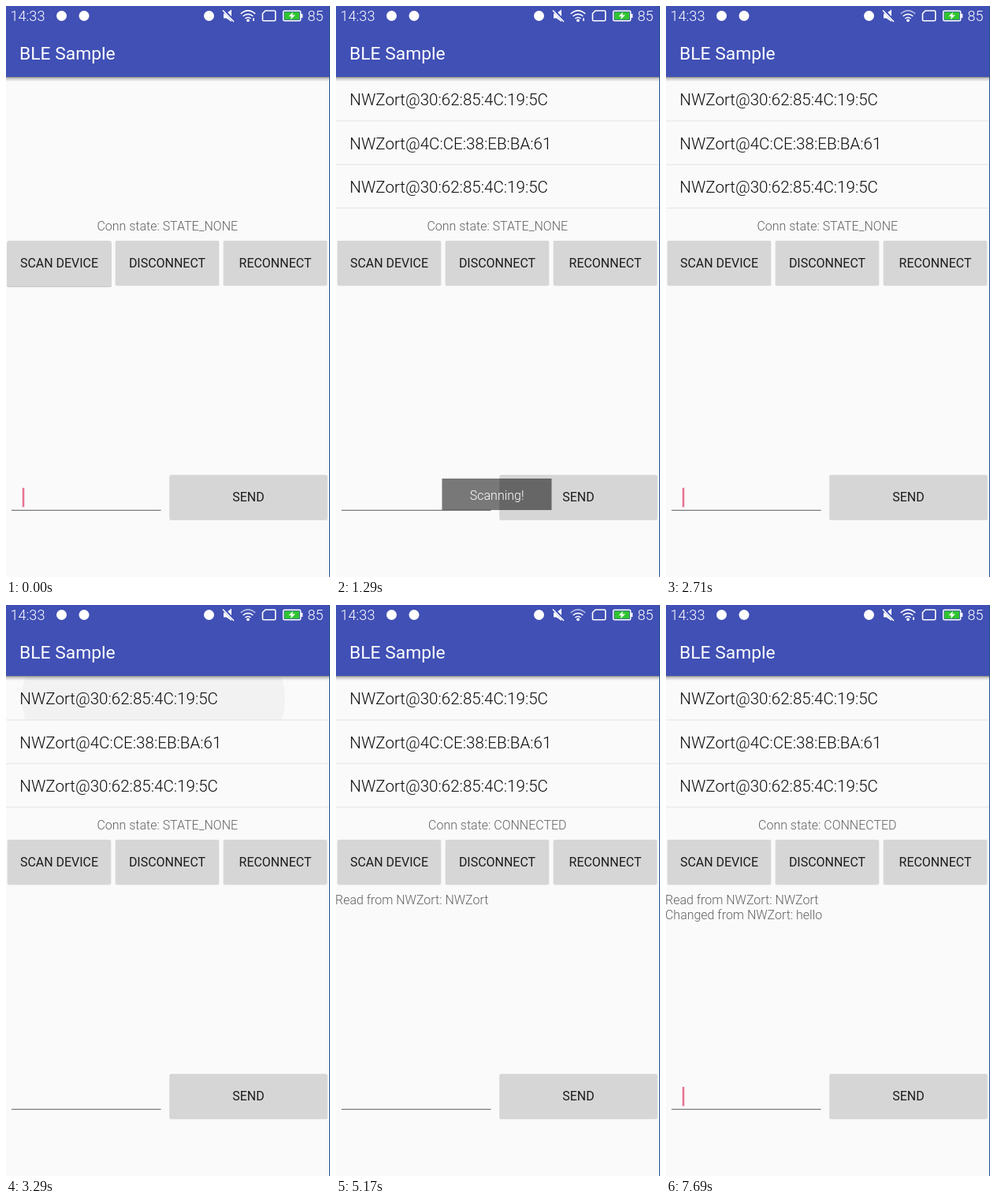
Recreate the animation shown at these times as an HTML page. Size 411 px wide and 725 px high, loop 8000 ms.

```html
<!DOCTYPE html>
<html lang="en">
<head>
<meta charset="utf-8">
<title>BLE Sample</title>
<style>
  html, body { margin: 0; width: 100%; height: 100%; overflow: hidden; background: #fafafa; }
  svg { display: block; width: 100%; height: 100%; }
  text { font-family: Roboto, "Noto Sans", sans-serif; font-weight: 300; font-size: 15.98px; }
  .clock { font-size: 18.1px; fill: #fff; }
  .title { font-size: 22.83px; font-weight: 400; fill: #fff; }
  .item { font-size: 20.55px; fill: #0c0c0c; }
  .note { fill: #626262; }
  .mid { text-anchor: middle; }
  .btn rect { fill: #d6d6d6; }
  .btn text { font-weight: 400; fill: #1d1d1d; text-anchor: middle; }
  .line { fill: none; stroke: #fff; stroke-width: 1.6; }

  /* Every change is a hard step on one 8 s clock. */
  .anim { animation: 8s step-end infinite; }
  .cursor { animation-name: blink; }
  .toast { animation-name: toast; }
  .press { animation-name: press; }
  .first { animation-name: first; }
  .rest { animation-name: rest; }
  .ripple { animation-name: ripple; }
  .idle { animation-name: idle; }
  .linked { animation-name: linked; }
  .read { animation-name: read; }
  .changed { animation-name: changed; }
  .arc { animation-name: arc; }
  .traffic { animation-name: traffic; }

  @keyframes blink {
    0%, 9.875%, 23%, 33.875%, 46.375%, 59.125%, 71.875%, 83.75%, 96.125%, 100% { opacity: 1; }
    3%, 16.125%, 29.375%, 39.625%, 53.375%, 64.625%, 78.375%, 90.75% { opacity: 0; }
  }
  @keyframes toast {
    0% { opacity: 0; }
    1.5% { opacity: .2; }
    3% { opacity: .57; }
    4.875% { opacity: .97; }
    6.75% { opacity: 1; }
    27.875% { opacity: .85; }
    29.375% { opacity: .6; }
    30.875% { opacity: .35; }
    32.375% { opacity: .13; }
    33.875%, 100% { opacity: 0; }
  }
  @keyframes press { 0% { opacity: 1; } 1.5%, 100% { opacity: 0; } }
  @keyframes first { 0% { opacity: 0; } 3%, 100% { opacity: 1; } }
  @keyframes rest { 0% { opacity: 0; } 4.875%, 100% { opacity: 1; } }
  @keyframes ripple {
    0% { opacity: 0; }
    39.625% { opacity: .07; }
    41.125% { opacity: .03; }
    44.625%, 100% { opacity: 0; }
  }
  @keyframes idle { 0% { opacity: 1; } 44.625%, 100% { opacity: 0; } }
  @keyframes linked { 0% { opacity: 0; } 44.625%, 100% { opacity: 1; } }
  @keyframes read { 0% { opacity: 0; } 64.625%, 100% { opacity: 1; } }
  @keyframes changed { 0% { opacity: 0; } 76.875%, 100% { opacity: 1; } }
  @keyframes arc { 0%, 92.625%, 100% { opacity: 1; } 17.75% { opacity: .6; } }
  @keyframes traffic { 0%, 78.375%, 100% { opacity: 1; } 27.875% { opacity: 0; } }
</style>
</head>
<body>
<svg viewBox="0 0 411 725" preserveAspectRatio="none">
  <defs>
    <linearGradient id="shade" x1="0" y1="0" x2="0" y2="1">
      <stop offset="0" stop-opacity=".5"/>
      <stop offset=".3" stop-opacity=".2"/>
      <stop offset="1" stop-opacity="0"/>
    </linearGradient>
    <clipPath id="row"><rect y="91" width="410" height="55"/></clipPath>
  </defs>
  <rect width="411" height="725" fill="#fafafa"/>

  <!-- device list -->
  <ellipse class="anim ripple" cx="187" cy="119" rx="167" ry="120" clip-path="url(#row)"/>
  <text class="item anim first" x="17.3" y="126">NWZort@30:62:85:4C:19:5C</text>
  <g class="anim rest">
    <text class="item" x="17.3" y="181.5">NWZort@4C:CE:38:EB:BA:61</text>
    <text class="item" x="17.3" y="237">NWZort@30:62:85:4C:19:5C</text>
    <path d="M0 146H410M0 201.3H410M0 256.6H410" stroke="#e4e4e4"/>
  </g>

  <!-- app bar -->
  <rect y="90" width="411" height="6" fill="url(#shade)"/>
  <rect width="411" height="90" fill="#4050b5"/>
  <text class="title" x="17" y="68">BLE Sample</text>

  <!-- status bar -->
  <text class="clock" x="5.5" y="19">14:33</text>
  <g fill="#fff">
    <circle cx="70.5" cy="12.5" r="6.5"/>
    <circle cx="99" cy="12.5" r="6.5"/>
    <circle cx="257.5" cy="12.5" r="6.5"/>
    <path d="M276 9.5H279.5L286 4.5V20L279.5 15.5H276Z"/>
  </g>
  <path d="M276 5L289.5 19.5" stroke="#4050b5" stroke-width="3.4"/>
  <path class="line" d="M275 5.5L289 20"/>
  <g class="line">
    <path class="anim arc" d="M297.8 9.8Q307 1.8 316.2 9.8"/>
    <path d="M300.6 13Q307 7.6 313.4 13M303.4 16Q307 13 310.6 16"/>
    <path class="anim traffic" d="M314 15.5V19" stroke-width="2"/>
  </g>
  <circle cx="307" cy="18.3" r="1.9" fill="#fff"/>
  <path class="line" d="M329 6H340.5Q341.8 6 341.8 7.3V17.5Q341.8 18.8 340.5 18.8H326.8Q325.5 18.8 325.5 17.5V9.5Z"/>
  <rect x="351.7" y="6.2" width="22" height="12.6" rx="1.5" fill="#4050b5" stroke="#fff" stroke-width="1.5"/>
  <rect x="374" y="10" width="2.3" height="5" fill="#fff"/>
  <rect x="353.2" y="7.7" width="19" height="9.6" fill="#2fc52f"/>
  <path d="M364 7.8L358.5 13.2H362L361 17.3L367 11.6H363.2Z" fill="#fff"/>
  <text class="clock" x="382.5" y="19">85</text>

  <!-- connection state and buttons -->
  <text class="note mid anim idle" x="204.8" y="285">Conn state: STATE_NONE</text>
  <text class="note mid anim linked" x="204.8" y="285">Conn state: CONNECTED</text>
  <rect class="anim press" x="1" y="299" width="133" height="58" rx="2.5" fill="#c8c8c8"/>
  <g fill="#e4e4e4">
    <rect x="1.5" y="298" width="132" height="57.5" rx="2"/>
    <rect x="138.5" y="298" width="132" height="57.5" rx="2"/>
    <rect x="275.5" y="298" width="132" height="57.5" rx="2"/>
    <rect x="207" y="595.5" width="201" height="57.5" rx="2"/>
  </g>
  <g class="btn">
    <rect x="2" y="298" width="131" height="57" rx="2"/>
    <rect x="139" y="298" width="131" height="57" rx="2"/>
    <rect x="276" y="298" width="131" height="57" rx="2"/>
    <rect x="207.5" y="595.5" width="200" height="57" rx="2"/>
    <text x="67.5" y="332">SCAN DEVICE</text>
    <text x="204.5" y="332">DISCONNECT</text>
    <text x="341.5" y="332">RECONNECT</text>
    <text x="307.5" y="629">SEND</text>
  </g>

  <!-- log -->
  <text class="note anim read" x="-1" y="379.5">Read from NWZort: NWZort</text>
  <text class="note anim changed" x="-1" y="398.5">Changed from NWZort: hello</text>

  <!-- input -->
  <path d="M7 640.3H196.5" stroke="#7c7c7c" stroke-width="1.2"/>
  <g class="anim cursor" fill="#e5688b">
    <rect x="20" y="611.5" width="4" height="25" fill-opacity=".25"/>
    <rect x="21" y="612" width="2" height="24" fill-opacity=".9"/>
  </g>

  <g class="anim toast">
    <rect x="134.5" y="600" width="139" height="40" fill-opacity=".52"/>
    <text class="mid" x="204.2" y="626.5" fill="#fff">Scanning!</text>
  </g>

  <rect x="410" width="1" height="725" fill="#24508c"/>
</svg>
</body>
</html>
```
